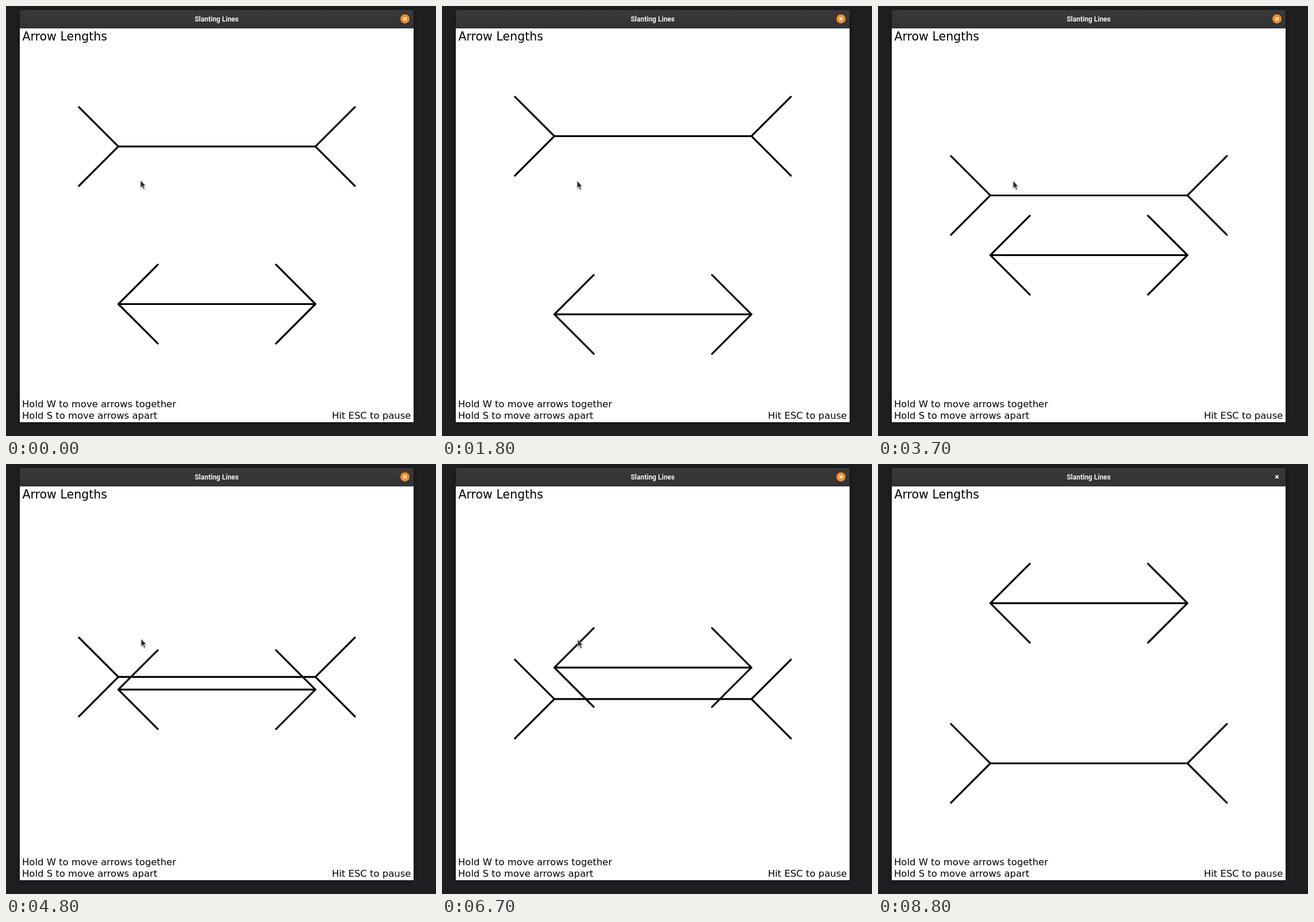
Animation of 748 by 748 pixels, one loop 8900 ms. Source, as an HTML page:

```html
<!DOCTYPE html>
<html lang="en">
<head>
<meta charset="utf-8">
<title>Arrow Lengths</title>
<style>
  html, body { margin: 0; width: 100%; height: 100%; overflow: hidden; background: #1e1f21; }
  svg { display: block; width: 100vw; height: 100vh; }
  .window { filter: drop-shadow(0 2px 4px rgba(0, 0, 0, .45)); }
  .arrow { fill: none; stroke: #000; stroke-width: 3.2; stroke-linecap: round; stroke-linejoin: round; }
  text { font-family: "DejaVu Sans", sans-serif; font-size: 16.44px; }
  .heading { font-size: 20.55px; }
  .caption { font: bold 12px Roboto, sans-serif; fill: #f2f2f2; text-anchor: middle; }
</style>
</head>
<body>
<svg viewBox="0 0 748 748">
  <defs>
    <linearGradient id="bar" x2="0" y2="1">
      <stop stop-color="#3a3a3a"/>
      <stop offset="1" stop-color="#323232"/>
    </linearGradient>
  </defs>
  <g class="window">
    <path d="M24 39V10q0-3 3-3H706q3 0 3 3V39z" fill="url(#bar)"/>
    <path d="M24 39H709V724H24z" fill="#fff"/>
  </g>
  <text class="caption" x="366.5" y="26.5">Slanting Lines</text>
  <circle id="focus" cx="694" cy="22.4" r="8" fill="#f48b2b"/>
  <path d="M691.3 19.7l5.4 5.4m0-5.4l-5.4 5.4" stroke="#fff" stroke-width="1.8"/>

  <text class="heading" x="28.4" y="60">Arrow Lengths</text>
  <text x="28" y="698.3">Hold W to move arrows together</text>
  <text x="28" y="718.3">Hold S to move arrows apart</text>
  <text x="704.4" y="718.3" text-anchor="end">Hit ESC to pause</text>

  <path id="outward" class="arrow"/>
  <path id="inward" class="arrow"/>
  <path id="cursor" d="M0 0V13.2L3 10.6L5.2 15.6L7.4 14.6L5.3 9.8H9.2z" fill="#282828" stroke="#fff" stroke-width=".8"
        style="filter: drop-shadow(0 1px 1px rgba(0, 0, 0, .35))"/>
</svg>
<script>
  const LOOP = 8900, STEP = 100;
  const LEFT = 195.4, RIGHT = 538.3, FIN = 68.6;
  const START = 244.4, MIRROR = 762.9, SPEED = 0.077;

  // Key presses as [down, up] in ms: S is held once, then W repeatedly
  const apart = [[410, 1085]];
  const together = [
    [1358, 2371], [2560, 2600], [2935, 3662], [3945, 4451],
    [4774, 4869], [5046, 5100], [5570, 5602], [6356, 8153]
  ];

  const part = id => document.getElementById(id);
  const place = (id, x, y) => part(id).setAttribute("transform", `translate(${x} ${y})`);
  const clamp = (v, lo, hi) => Math.min(Math.max(v, lo), hi);
  const held = (presses, t) => presses.reduce((sum, [down, up]) => sum + clamp(t, down, up) - down, 0);

  // A positive reach points the fins away from the shaft
  function shape(id, reach) {
    const fins = (x, dx) => `M${x + dx} ${-FIN}L${x} 0L${x + dx} ${FIN}`;
    part(id).setAttribute("d", `M${LEFT} 0H${RIGHT}` + fins(LEFT, -reach) + fins(RIGHT, reach));
  }

  function draw(now) {
    const t = Math.floor(now % LOOP / STEP) * STEP;
    const y = START + SPEED * (held(together, t) - held(apart, t));
    place("outward", 0, y);
    place("inward", 0, MIRROR - y);

    // The pointer drifts by single pixels, then leaves through the top
    const drift = Math.floor((t + 2800) / 4200);
    const leave = clamp((t - 8200) / 500, 0, 1) ** 1.3;
    place("cursor", 234 + drift - 197 * leave, 303 + drift - 311 * leave);

    const visibility = t < 8800 ? "visible" : "hidden";
    part("cursor").style.visibility = part("focus").style.visibility = visibility;
    requestAnimationFrame(draw);
  }

  shape("outward", FIN);
  shape("inward", -FIN);
  draw(performance.now());
</script>
</body>
</html>
```
